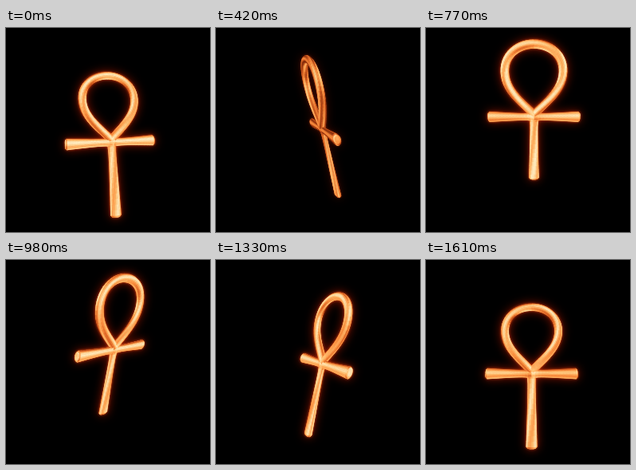
Recreate the animation shown at these times as an HTML page with a canvas. Size 256x256 px, loop 1.68 s.

```html
<!DOCTYPE html>
<html lang="en">
<head>
<meta charset="utf-8">
<title>Turning ankh</title>
<style>
  html, body { margin: 0; width: 100%; height: 100%; overflow: hidden; background: #000; }
  canvas {
    display: block; width: 256px; height: 256px;
    filter: drop-shadow(0 0 1.5px rgba(235, 75, 12, var(--heat))) drop-shadow(0 0 6px rgba(150, 20, 0, var(--heat)));
  }
</style>
</head>
<body>
<canvas id="stage" width="256" height="256"></canvas>
<script>
const stage = document.getElementById('stage');
const ctx = stage.getContext('2d');
const STEP = 70, STEPS = 24, SIDES = 20;
const CAMERA = 300, LEAN = 0.24;
const RAMP = [[132, 46, 14], [212, 94, 34], [252, 148, 68], [255, 196, 118], [255, 236, 190]];

const clamp = (x, lo, hi) => Math.max(lo, Math.min(hi, x));
const bump = (x, mid, width) => Math.exp(-(((x - mid) / width) ** 2));

function bezier(a, b, c, d, t) {
  const k = 1 - t;
  const mix = i => k * k * k * a[i] + 3 * k * k * t * b[i] + 3 * k * t * t * c[i] + t * t * t * d[i];
  return [mix(0), mix(1)];
}

// Half of the loop, from the crossing up to the crown.
function loopHalf(side) {
  const pts = [];
  for (let i = 0; i <= 28; i++) {
    const t = i / 14;
    const [x, y] = t <= 1
      ? bezier([0, -3], [-13, -17], [-35, -32], [-35, -55], t)
      : bezier([-35, -55], [-35, -75], [-19, -87], [0, -87], t - 1);
    pts.push({ x: x * side, y, r: 4.6 });
  }
  return pts;
}

// Flared bar that leaves the crossing in direction (dx, dy).
function bar(dx, dy, length, thin, thick) {
  const pts = [], add = (d, r) => pts.push({ x: dx * d, y: dy * d, r });
  for (let i = 0; i <= 14; i++) {
    const t = i / 14, d = t * (length - 1.5);
    add(d, thin + (thick - thin) * t ** 1.4 + 2.2 * Math.exp(-d / 5));
  }
  add(length - 0.3, thick - 1);
  add(length, thick - 2.2);
  add(length, 0);
  return pts;
}

// Sweep an oval section along a line into facets with normals.
function tube(pts, depth) {
  const end = pts.length - 1;
  const dirs = pts.map((_, i) => {
    const a = pts[Math.max(0, i - 1)], b = pts[Math.min(end, i + 1)];
    const len = Math.hypot(b.x - a.x, b.y - a.y) || 1;
    return [(b.x - a.x) / len, (b.y - a.y) / len];
  });
  // The closing rings share the direction of the bar.
  if (pts[end].r === 0) dirs[end] = dirs[end - 1] = dirs[end - 2];
  const vertex = (i, a) => {
    const p = pts[i], [tx, ty] = dirs[i], c = Math.cos(a) * p.r;
    return [p.x - ty * c, p.y + tx * c, Math.sin(a) * p.r * depth];
  };
  const faces = [];
  for (let i = 0; i < end; i++) {
    const p = pts[i], q = pts[i + 1], [tx, ty] = dirs[i];
    const ds = Math.hypot(q.x - p.x, q.y - p.y), dr = q.r - p.r;
    for (let j = 0; j < SIDES; j++) {
      const a = j / SIDES * Math.PI * 2, b = (j + 1) / SIDES * Math.PI * 2;
      const m = (a + b) / 2, c = Math.cos(m) * ds, w = Math.sin(m) * ds / depth;
      const len = Math.hypot(c, w, dr);
      faces.push({
        corners: [vertex(i, a), vertex(i, b), vertex(i + 1, b), vertex(i + 1, a)],
        normal: [(-ty * c - tx * dr) / len, (tx * c - ty * dr) / len, w / len]
      });
    }
  }
  return faces;
}

const faces = [
  tube(loopHalf(1), 0.85), tube(loopHalf(-1), 0.85),
  tube(bar(-1, 0, 57, 3.6, 6.2), 0.7), tube(bar(1, 0, 57, 3.6, 6.2), 0.7),
  tube(bar(0, 1, 85, 4.2, 6.2), 0.55)
].flat();

function project([u, v, w], turn) {
  const f = w + LEAN * v, swing = Math.cos(turn - 0.3);
  const side = -u * Math.sin(turn), front = f * Math.cos(turn);
  const z = side + front, s = CAMERA / (CAMERA - z);
  return [
    134 - 1.5 * swing + s * (u * Math.cos(turn) + f * Math.sin(turn)),
    127 + 16.3 * swing + s * (v + 0.19 * side + 0.1 * front),
    z
  ];
}

function metal(nx, ny, nz, height, turn, heat) {
  const flash = 0.15 * bump(turn, 2.6, 0.5);
  const rim = 0.26 * (1 - Math.abs(nz)) ** 2;
  const stripes = 0.2 * Math.cos(5 * ny + 1) + 0.2 * Math.sin(5 * nx + height / 14 + turn);
  const pos = clamp(0.3 + 0.42 * heat + stripes - rim + flash, 0, 0.999) * (RAMP.length - 1);
  const i = Math.floor(pos);
  return `rgb(${RAMP[i].map((c, k) => Math.round(c + (RAMP[i + 1][k] - c) * (pos - i)))})`;
}

function draw(turn) {
  const cos = Math.cos(turn), sin = Math.sin(turn);
  const heat = 0.85 - 0.5 * bump(turn, 1.75, 0.5);
  const visible = [];
  for (const { corners, normal: [nu, nv, nw] } of faces) {
    const nz = nw * cos - nu * sin;
    if (nz < -0.4) continue;
    const pts = corners.map(p => project(p, turn));
    visible.push({
      pts,
      z: pts.reduce((sum, p) => sum + p[2], 0),
      color: metal(nu * cos + nw * sin, nv, nz, corners[0][1], turn, heat)
    });
  }
  visible.sort((a, b) => a.z - b.z);
  stage.style.setProperty('--heat', heat);
  ctx.clearRect(0, 0, 256, 256);
  ctx.lineWidth = 0.5;
  ctx.lineJoin = 'round';
  for (const { pts, color } of visible) {
    ctx.beginPath();
    pts.forEach(([x, y]) => ctx.lineTo(x, y));
    ctx.closePath();
    ctx.fillStyle = ctx.strokeStyle = color;
    ctx.fill();
    ctx.stroke();
  }
}

let shown = -1;
const start = performance.now();
function tick() {
  const step = Math.floor((performance.now() - start) / STEP) % STEPS;
  if (step !== shown) {
    shown = step;
    draw((step + 1) / STEPS * Math.PI * 2);
  }
  requestAnimationFrame(tick);
}
tick();
</script>
</body>
</html>
```
